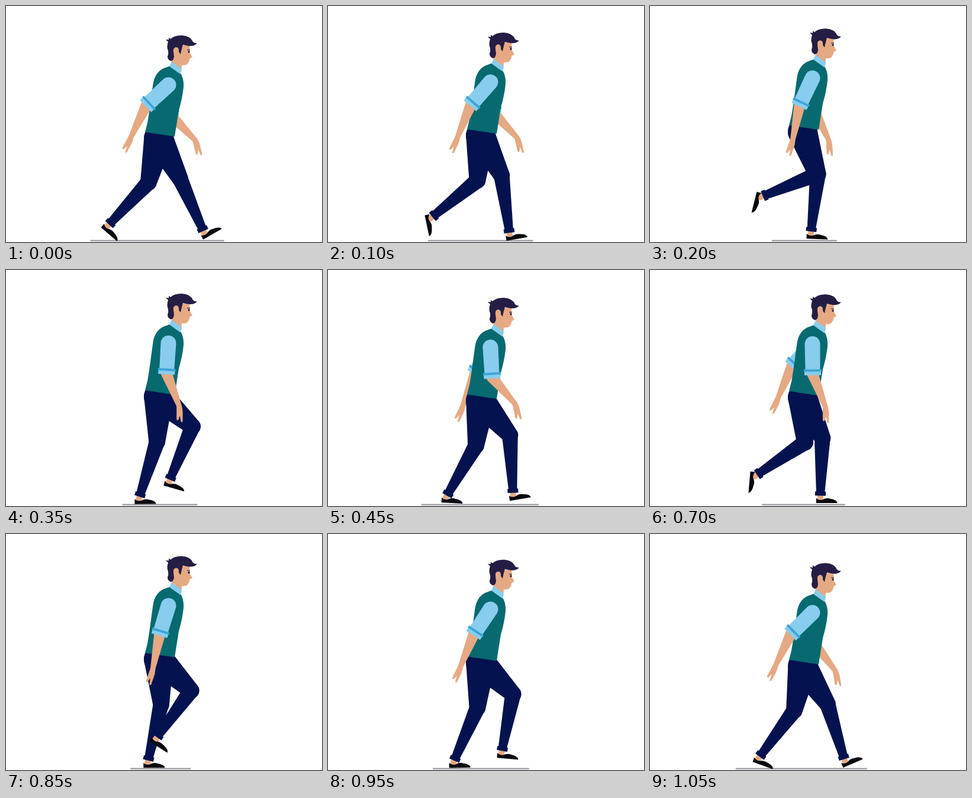
Write an HTML page that moves like this. It is 534 px wide and 400 px high and loops after 1.1 s.

```html
<!DOCTYPE html>
<html lang="en">
<head>
<meta charset="utf-8">
<title>Walking man</title>
<style>
  html, body { margin: 0; width: 100%; height: 100%; overflow: hidden; background: #fff; }
  svg { display: block; width: 100%; height: 100%; }
  .skin { fill: #e5a983; }
  .navy { fill: #04134f; }
  .vest { fill: #076a70; }
  .shirt { fill: #88cdee; }
  .band { fill: #3da5d7; }
  .hair { fill: #251d44; }
  .shoe { fill: #08080f; }
</style>
</head>
<body>
<svg viewBox="0 0 534 400">
  <path id="ground" stroke="#a2a2a8" stroke-width="2.5"/>
  <g id="farArm"></g>
  <g id="farLeg"></g>
  <g id="nearLeg"></g>
  <g id="body">
    <path class="skin" d="M283 57L310 54L311 68L315 75L310.500 77.500L309.500 82L307 86Q305 89 297 88.500L296.500 99L279 88Z"/>
    <path class="hair" d="M274 49L270 45L275 45.500L275 42L278 44Q284 38 297 38Q312 39 316 49Q319 52 323 51Q319 57 309 56L299 54Q297 60 295 70L292 66Q293 58 287 58Q282 59 283 66L284 74Q283 82 278 81.500Q273 79 273 74Q275 69 274 64Q271 58 274 49Z"/>
    <path d="M306 62.500H311" stroke="#251d44"/>
    <ellipse class="hair" cx="309" cy="65.800" rx="1.500" ry="2"/>
    <path class="vest" d="M277 90L295 102Q301 112 300 126Q298 145 292 165L285 209.500L235 202Q240 185 242 168L248 124Q250 102 266 94Z"/>
    <path class="shirt" d="M280 82.500L297 95.500L295 104L276 90.500Z"/>
  </g>
  <g id="nearArm"></g>
</svg>
<script>
const PERIOD = 1100, STEP = 50;
const THIGH = 76, SHIN = 95, UPPER_ARM = 51, FOREARM = 59;
const FAR_ARM_LAG = 70;

// Key poses of one stride, angles in degrees; limbs are measured from straight down
const STRIDE = [
  { at: 0, thigh: 28, shin: 24, foot: -30 },    // heel strike
  { at: 150, thigh: 26, shin: -2, foot: 0 },    // foot flat
  { at: 325, thigh: 0, shin: -15, foot: 0 },    // weight over foot
  { at: 450, thigh: -6, shin: -30, foot: 3 },   // heel about to lift
  { at: 550, thigh: -13, shin: -43, foot: 41 }, // push off
  { at: 700, thigh: 3, shin: -56, foot: 95 },   // trailing
  { at: 750, thigh: 18, shin: -68, foot: 104 }, // fully folded
  { at: 850, thigh: 46, shin: -36, foot: 33 },  // knee forward
  { at: 950, thigh: 46, shin: -11, foot: 5 }    // reaching
];

const byId = id => document.getElementById(id);
const path = (cls, d, extra = "") => `<path class="${cls}" d="${d}" ${extra}/>`;
const place = ([x, y], angle) => `transform="translate(${x} ${y}) rotate(${angle})"`;
const wave = (t, period = PERIOD) => Math.cos(2 * Math.PI * t / period);

function along([x, y], angle, length) {
  const r = angle * Math.PI / 180;
  return [x + Math.sin(r) * length, y + Math.cos(r) * length];
}

// Smooth periodic curve through the key poses
function stridePose(time) {
  const t = time % PERIOD, n = STRIDE.length;
  const pose = i => {
    const turn = Math.floor(i / n), p = STRIDE[i - turn * n];
    return { ...p, at: p.at + turn * PERIOD };
  };
  let i = n - 1;
  while (STRIDE[i].at > t) i--;
  const [a, b, c, d] = [i - 1, i, i + 1, i + 2].map(pose);
  const span = c.at - b.at, u = (t - b.at) / span;
  const curve = key => {
    const diff = c[key] - b[key];
    const m0 = (c[key] - a[key]) / (c.at - a.at) * span;
    const m1 = (d[key] - b[key]) / (d.at - b.at) * span;
    return b[key] + u * (m0 + u * (3 * diff - 2 * m0 - m1 + u * (m0 + m1 - 2 * diff)));
  };
  return { thigh: curve("thigh"), shin: curve("shin"), foot: curve("foot") };
}

// Tapered limb with a round start and an optional round end
function limb(cls, from, angle, length, r1, r2, round = true) {
  const to = along(from, angle, length);
  const [p1, p2] = [90, -90].map(side => along(from, angle + side, r1));
  const [q1, q2] = [90, -90].map(side => along(to, angle + side, r2));
  const end = round ? `A${r2} ${r2} 0 0 1 ${q2}` : `L${q2}`;
  return path(cls, `M${p1}L${q1}${end}L${p2}A${r1} ${r1} 0 0 1 ${p1}Z`);
}

function drawLeg(id, t, drop) {
  const { thigh, shin, foot } = stridePose(t);
  const hip = [258, 213 + drop];
  const knee = along(hip, thigh, THIGH), ankle = along(knee, shin, SHIN);
  byId(id).innerHTML =
    limb("skin", ankle, shin, 8, 5, 5) +
    path("shoe", "M-7 0Q-3 4 3 3Q10 -1 16 1Q29 3 29 8.500H-7Z", place(along(ankle, shin, 7), foot)) +
    limb("navy", hip, thigh, THIGH, 25, 14) +
    limb("navy", knee, shin, SHIN, 13.5, 7, false) +
    path("navy", "M-9 -4H9V3H-9Z", place(ankle, -shin));
}

function drawArm(id, t, drop) {
  const bend = t + 25;
  const upper = -17 - 26 * wave(t) - 4 * wave(2 * t);
  const fore = 4 - 36 * wave(bend) + 6 * wave(2 * bend);
  const hand = 0.6 * fore - 8;
  const shoulder = [274.5, 122 + drop];
  const elbow = along(shoulder, upper, UPPER_ARM), wrist = along(elbow, fore, FOREARM);
  byId(id).innerHTML =
    limb("skin", elbow, fore, FOREARM, 9.5, 4.2) +
    path("skin", "M-4.200 -1L4.200 -1Q6 8 5 15L4 27Q2 30 1 27L0 17L-3 24Q-6 26 -6 22L-5 10Z",
      place(wrist, -hand)) +
    limb("shirt", shoulder, upper, 45, 13, 12.5, false) +
    path("shirt", "M-14 -5H14V2H-14Z", place(elbow, -upper)) +
    path("band", "M-15 -8H15V-4H-15Z", place(elbow, -upper));
}

function draw(t) {
  const half = PERIOD / 2;
  const spread = wave(t + 15, half); // 1 with the legs apart, -1 as they pass
  const drop = 5.3 + 6.5 * spread;
  const middle = 258.5 - 3 * spread, reach = 80.5 + 33 * spread;
  byId("ground").setAttribute("d", `M${middle - reach} 397.700H${middle + reach}`);
  byId("body").setAttribute("transform", `translate(0 ${drop})`);
  drawArm("farArm", t + half - FAR_ARM_LAG, drop);
  drawLeg("farLeg", t + half, drop);
  drawLeg("nearLeg", t, drop);
  drawArm("nearArm", t, drop);
}

const start = performance.now();
function tick() {
  const elapsed = (performance.now() - start) % PERIOD;
  draw(Math.floor(elapsed / STEP) * STEP);
  requestAnimationFrame(tick);
}
tick();
</script>
</body>
</html>
```
